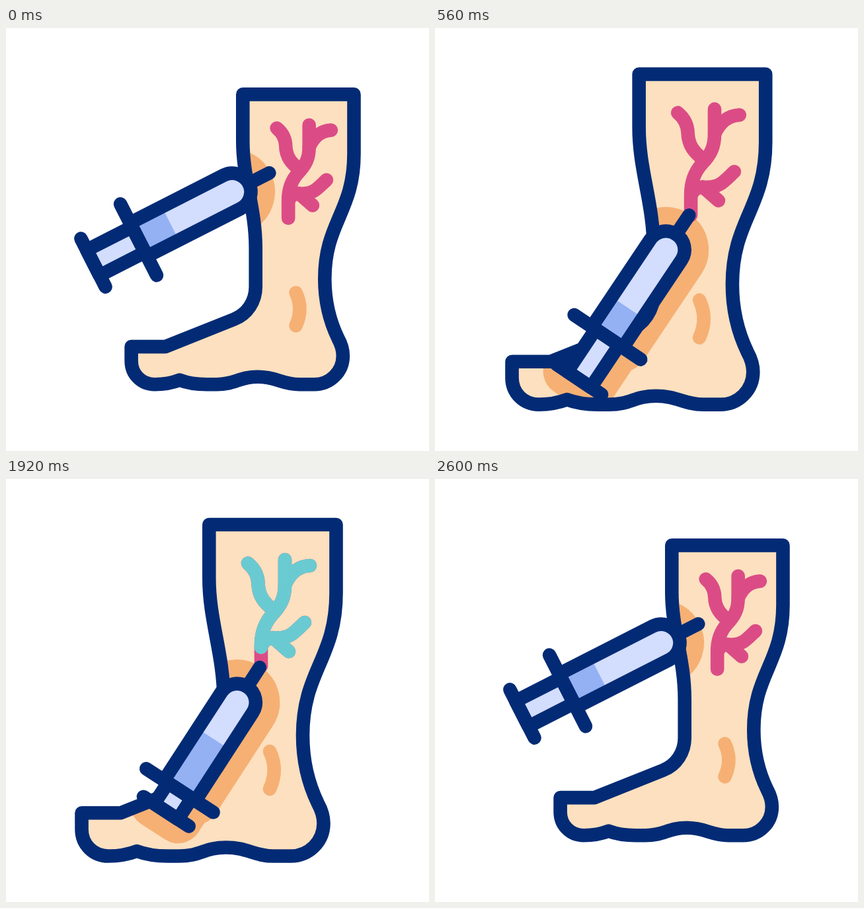
An HTML page with a canvas that plays this animation: 640x640 px, repeating every 3 s.

```html
<!DOCTYPE html>
<html lang="en">
<head>
<meta charset="utf-8">
<title>Vein injection</title>
<style>
  html, body { margin: 0; width: 100%; height: 100%; overflow: hidden; background: #fff; }
  canvas { display: block; width: 640px; height: 640px; }
</style>
</head>
<body>
<canvas id="stage" width="640" height="640"></canvas>
<script>
const ctx = document.getElementById('stage').getContext('2d');
const LOOP = 3000, LINE = 20.6, SHADOW = 73;
const NAVY = '#032b75', SKIN = '#fce0bf', ORANGE = '#f6b074', PINK = '#db4c86',
      TEAL = '#69cbd1', GLASS = '#d3ddfd', LIQUID = '#94b1f3';

const LEG = new Path2D(`M307.3 69H499.5V172C499.5 272 449 290 449 388
  C449 424 457 460 472 491C477 500 480.5 510 480.5 521C480.5 549 458 570.5 431 570.5
  H405C375 570.5 366 557.5 333 557.5C300 557.5 295 570.5 262 570.5H245
  C226 570.5 211 568 198 563C185 568 172 570.5 155 570.5
  C132 570.5 114.5 553 114.5 530V505.3H173.5L292 458C315 449 329.5 427 329.5 402V335
  C329.5 265 307.3 215 307.3 150Z`);
const CALF = new Path2D('M399 412C407.7 430 407.7 450 399 469');

// Each vein: path, time span of filling, time span of draining
const VEINS = [
  ['M386 283V252C386 232 392 217 403 205C416 191 422 180 422 160V122', 600, 1300, 1740, 2440],
  ['M404 198C392 188 382 178 381.5 158C381 144 374 134 366 127.5', 900, 1500, 2040, 2600],
  ['M422 160C430 143 441 132 460 131', 1150, 1600, 2190, 2600],
  ['M388 250C392 241 400 240.5 412 240.5C430 240.5 436 232 452 217', 850, 1300, 1930, 2230],
  ['M404 240L428 261', 850, 1200, 1930, 2230]
].map(([d, ...times]) => {
  const el = document.createElementNS('http://www.w3.org/2000/svg', 'path');
  el.setAttribute('d', d);
  return { path: new Path2D(d), length: el.getTotalLength(), times };
});

const lerp = (a, b, k) => a + (b - a) * k;
const part = (t, a, b) => Math.min(1, Math.max(0, (t - a) / (b - a)));
const smooth = k => k * k * (3 - 2 * k);
const sineOut = k => Math.sin(k * Math.PI / 2);
const quadInOut = k => k < .5 ? 2 * k * k : 1 - 2 * (1 - k) * (1 - k);

function stroke(path, color, width = LINE) {
  ctx.strokeStyle = color;
  ctx.lineWidth = width;
  ctx.stroke(path);
}

function fill(path, color) {
  ctx.fillStyle = color;
  ctx.fill(path);
}

function line(x1, y1, x2, y2) {
  const path = new Path2D();
  path.moveTo(x1, y1);
  path.lineTo(x2, y2);
  stroke(path, NAVY);
}

// Syringe space: origin at the centre of the barrel's round end, needle pointing up
const HANDLE = 159, R = 28.3, ROD = 21.5;
const barrel = new Path2D(`M${-R} ${HANDLE}V0A${R} ${R} 0 0 1 ${R} 0V${HANDLE}Z`);

function rodPath(gap) {
  const path = new Path2D();
  path.rect(-ROD, HANDLE, 2 * ROD, gap);
  return path;
}

function inSyringe(pose, draw) {
  ctx.save();
  ctx.translate(pose.x, pose.y);
  ctx.rotate(pose.angle);
  draw(pose.gap);
  ctx.restore();
}

function drawShadow(gap) {
  for (const path of [barrel, rodPath(gap)]) {
    fill(path, ORANGE);
    stroke(path, ORANGE, SHADOW);
  }
}

function drawSyringe(gap) {
  const rod = rodPath(gap), level = 28 + gap, end = HANDLE + gap;
  fill(rod, GLASS);
  stroke(rod, NAVY);
  fill(barrel, GLASS);
  ctx.fillStyle = LIQUID;
  ctx.fillRect(-R, level, 2 * R, HANDLE - level);
  stroke(barrel, NAVY);
  line(0, -R, 0, -63);
  line(-60.5, HANDLE, 60.5, HANDLE);
  line(-41, end, 41, end);
}

function drawVeins(t, place, scale) {
  for (const v of VEINS) stroke(place(v.path), PINK);
  for (const v of VEINS) {
    const [fillStart, fillEnd, drainStart, drainEnd] = v.times;
    const from = smooth(part(t, drainStart, drainEnd));
    const to = smooth(part(t, fillStart, fillEnd));
    if (to <= from) continue;
    const length = v.length * scale;
    ctx.setLineDash([(to - from) * length + .2, 9999]);
    ctx.lineDashOffset = -from * length;
    stroke(place(v.path), TEAL);
  }
  ctx.setLineDash([]);
}

function draw(t) {
  const zoom = smooth(part(t, 200, 600)) - smooth(part(t, 2000, 2400));
  const push = sineOut(part(t, 600, 1600)) - quadInOut(part(t, 2000, 2600));
  const scale = lerp(.875, 1, zoom);
  const matrix = new DOMMatrix([scale, 0, 0, scale,
    lerp(358.3, 307.3, zoom) - 307.3 * scale, 320 - 320 * scale]);
  // Paths are scaled, line widths are not
  const place = path => {
    const placed = new Path2D();
    placed.addPath(path, matrix);
    return placed;
  };
  const pose = {
    x: lerp(342.2, 349.5, zoom),
    y: lerp(248, 338, zoom),
    angle: lerp(63, 33, zoom) * Math.PI / 180,
    gap: lerp(77, 37.8, push)
  };
  const leg = place(LEG);

  ctx.fillStyle = '#fff';
  ctx.fillRect(0, 0, 640, 640);
  ctx.lineCap = ctx.lineJoin = 'round';
  fill(leg, SKIN);
  ctx.save();
  ctx.clip(leg);
  inSyringe(pose, drawShadow);
  ctx.restore();
  stroke(place(CALF), ORANGE);
  drawVeins(t, place, scale);
  stroke(leg, NAVY);
  inSyringe(pose, drawSyringe);
}

function tick() {
  draw(performance.now() % LOOP);
  requestAnimationFrame(tick);
}
tick();
</script>
</body>
</html>
```
